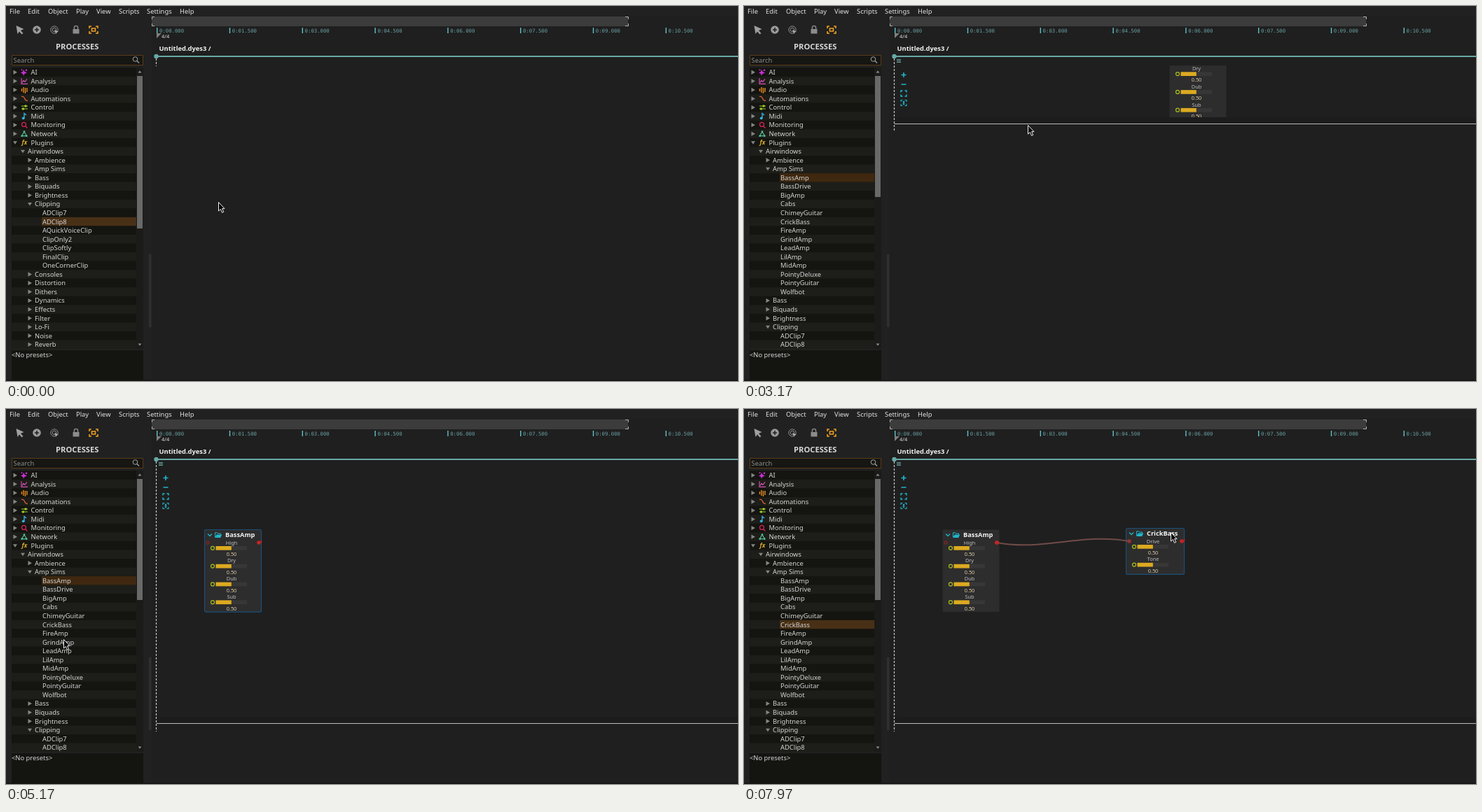
Animation of 1045 by 536 pixels, one loop 8 s. Source, as an HTML page with a canvas:

```html
<!DOCTYPE html>
<html lang="en">
<head>
<meta charset="utf-8">
<title>Processes</title>
<style>
html, body { margin: 0; width: 100%; height: 100%; overflow: hidden; background: #212121; }
canvas { display: block; }
</style>
</head>
<body>
<canvas id="stage" width="1045" height="536"></canvas>
<script>
const LOOP = 8000;
const c = document.getElementById('stage').getContext('2d');
const SANS = '"Noto Sans", "Open Sans", sans-serif';
const UI = '9.4px ' + SANS, SMALL = '7.4px ' + SANS, BOLD = 'bold 9.25px ' + SANS;
const MONO = '7.3px "DejaVu Sans Mono", monospace';
const CYAN = '#20b5cc', RED = '#c62424', TEAL = '#68a9a6';

// Pointer path: time, x, y
const path = [
  [0, 303, 280], [300, 303, 280], [860, 226, 262], [1400, 50, 231], [1500, 50, 231], [1870, 55, 239],
  [1950, 58, 243], [2380, 330, 230], [2600, 330, 230], [3170, 405, 170], [3370, 405, 170],
  [3750, 405, 451], [4170, 672, 197], [4230, 672, 197], [4700, 348, 184], [5170, 82, 329],
  [5400, 78, 307], [5500, 78, 307], [5830, 345, 205], [5950, 360, 191], [6100, 360, 191],
  [6600, 470, 170], [6970, 502, 165], [7150, 502, 165], [7420, 463, 178], [7530, 463, 178], [7970, 609, 176]
];
const EXPAND = 1470, PICK_A = 1950, DROP_A = 2400, GRAB_A = 4230, RELEASE_A = 4700,
      PICK_B = 5450, DROP_B = 6050;

function pointer(t) {
  const i = path.findIndex(p => p[0] > t);
  if (i < 0) return path[path.length - 1].slice(1);
  const [t0, x0, y0] = path[i - 1], [t1, x1, y1] = path[i];
  const u = (t - t0) / (t1 - t0), k = u * u * (3 - 2 * u);
  return [x0 + (x1 - x0) * k, y0 + (y1 - y0) * k];
}

function rect(x, y, w, h, fill) { c.fillStyle = fill; c.fillRect(x, y, w, h); }
function text(s, x, y, font, fill, align = 'left') {
  c.font = font; c.fillStyle = fill; c.textAlign = align;
  c.fillText(s, x, y);
}
function disc(x, y, r, fill) {
  c.beginPath(); c.arc(x, y, r, 0, 7); c.fillStyle = fill; c.fill();
}
function ring(x, y, r, color, w = 1) {
  c.beginPath(); c.arc(x, y, r, 0, 7); c.strokeStyle = color; c.lineWidth = w; c.stroke();
}
function line(d, color, w = 1, x = 0, y = 0) {
  c.save(); c.translate(x, y); c.strokeStyle = color; c.lineWidth = w;
  c.stroke(new Path2D(d)); c.restore();
}
function shape(d, color, x = 0, y = 0) {
  c.save(); c.translate(x, y); c.fillStyle = color; c.fill(new Path2D(d)); c.restore();
}

// Icons are centred on 0,0
const icons = {
  AI: (x, y) => {
    shape('M-1-4L.5-1 4 1 .5 2-1 5-2 2-5 1-2-1Z', '#c92fd6', x, y);
    disc(x + 3, y - 3, 1.3, '#c92fd6'); disc(x - 3.5, y - 3.5, 1, '#c92fd6');
  },
  Analysis: (x, y) => line('M-4-4V4H5M-3 2L-1-1 1 1 4-3', '#cf4fae', 1.2, x, y),
  Audio: (x, y) => line('M-3.5-2V2M-1-4V4M1.5-3V5M4-3V3', '#e58a22', 1.4, x, y),
  Automations: (x, y) => line('M-4-3H-2C1-3 0 3 4 3H5', '#d9603a', 1.3, x, y),
  Control: (x, y) => {
    line('M-4-2H5M-4 2H5', '#9ccc2e', 1.2, x, y);
    disc(x + 2, y - 2, 1.7, '#9ccc2e'); disc(x - 1.5, y + 2, 1.7, '#9ccc2e');
  },
  Midi: (x, y) => {
    line('M0 3V-4L3-1.5', '#35b2dc', 1.4, x, y); disc(x - 1.3, y + 2.8, 1.9, '#35b2dc');
  },
  Monitoring: (x, y) => { ring(x - .5, y - .7, 3, '#d0245c', 1.3); line('M2 2L4.5 4.5', '#d0245c', 1.4, x, y); },
  Network: (x, y) => {
    line('M0-3L-3.5 3H3.5Z', '#52c49a', 1.1, x, y);
    disc(x, y - 3, 1.3, '#52c49a'); disc(x - 3.3, y + 3, 1.3, '#52c49a'); disc(x + 3.3, y + 3, 1.3, '#52c49a');
  },
  Plugins: (x, y) => text('fx', x - 3.5, y + 3, 'italic bold 8.5px ' + SANS, '#dfb02c')
};

const words = s => s.split(' ');
const amps = words('BassAmp BassDrive BigAmp Cabs ChimeyGuitar CrickBass FireAmp GrindAmp LeadAmp LilAmp MidAmp PointyDeluxe PointyGuitar Wolfbot');
const clips = words('ADClip7 ADClip8 AQuickVoiceClip ClipOnly2 ClipSoftly FinalClip OneCornerClip');
const groups = ['Ambience', 'Amp Sims', ...words('Bass Biquads Brightness Clipping Consoles Distortion Dithers Dynamics Effects Filter Lo-Fi Noise Reverb')];

function treeRows(open) {
  const rows = Object.keys(icons).map(name => ({ name, depth: 0, open: name === 'Plugins' }));
  rows.push({ name: 'Airwindows', depth: 1, open: true });
  for (const name of groups) {
    const kids = name === 'Clipping' ? clips : name === 'Amp Sims' && open ? amps : [];
    rows.push({ name, depth: 2, open: kids.length > 0 });
    kids.forEach(kid => rows.push({ name: kid, depth: 3 }));
  }
  return rows.slice(0, 32);
}

function drawTree(t) {
  const open = t >= EXPAND, pitch = 12.55, top = 88.5;
  const picked = t < PICK_A ? 'ADClip8' : t < PICK_B ? 'BassAmp' : 'CrickBass';
  rect(8, 88, 188, 402, '#161613');
  treeRows(open).forEach(({ name, depth, open }, i) => {
    const y = top + i * pitch, mid = y + pitch / 2;
    rect(8, y, 178, pitch, i % 2 ? '#1d1d19' : '#141410');
    if (name === picked) rect(51, y, 135, pitch, i % 2 ? '#483016' : '#3f280f');
    if (depth < 3) shape(open ? 'M-3-2H3L0 2.5Z' : 'M-2.5-3.2L3 0-2.5 3.2Z', '#858585', [13, 24, 34][depth], mid);
    if (icons[name]) icons[name](26, mid);
    text(name, [35.5, 31, 41, 52][depth], mid + 3.4, UI, '#d4d4d4');
  });
  rect(186, 88, 10, 402, '#1b1b19');
  rect(187, 100, 8, open ? 173 : 218, '#696969');
  shape('M-2.5 1.5H2.5L0-1.5Z', '#909090', 191, 94);
  shape('M-2.5-1.5H2.5L0 1.5Z', '#909090', 191, 484);
}

function drawSidebar(t) {
  let x = [5, 31, 60, 100, 129, 161, 201, 248];
  words('File Edit Object Play View Scripts Settings Help').forEach((s, i) => text(s, x[i], 11, UI, '#e2e2e2'));

  shape('M-5-6L6-1 1.5 1 5 5 3 6.5-.5 2.5-3 6Z', '#a0a0a0', 19.5, 34);
  disc(44, 34, 5.8, '#9a9a9a');
  line('M-3 0H3M0-3V3', '#212121', 1.6, 44, 34);
  ring(69, 34, 5.2, '#8c8c8c'); ring(69, 34, 2.8, '#8c8c8c');
  shape('M0 0L6 2.5 3.5 3.5 2.5 6Z', '#b0b0b0', 69, 34);
  rect(95.5, 33, 9, 6.5, '#8c8c8c');
  line('M-2.6 0V-2A2.6 2.6 0 0 1 2.6-2V0', '#8c8c8c', 1.4, 100, 33);
  line('M-6-2V-5H-3M3-5H6V-2M6 2V5H3M-3 5H-6V2', '#f0a020', 1.6, 125, 34);
  line('M-2.5-2H2.5V2H-2.5Z', '#f0a020', 1.6, 125, 34);

  text('PROCESSES', 101.7, 62, 'bold 11.2px ' + SANS, '#d6d6d6', 'center');
  rect(8, 70, 188, 15, '#161613');
  line('M8.5 70.5H195.5V84.5H8.5Z', '#593c18');
  text('Search', 10.5, 80.5, UI, '#8c8c8c');
  ring(184.5, 76, 3.3, '#a5a5a5'); line('M187 78.5L190 81.5', '#a5a5a5', 1.2);

  drawTree(t);
  rect(8, 492, 188, 44, '#141411');
  text('<No presets>', 8, 502, UI, '#d4d4d4');
  rect(204, 355, 3.5, 104, '#303030');
}

function drawTimeline() {
  rect(208, 15, 680, 14, '#3c3c3c');
  line('M212 15.5H208.5V19M208.5 25V28.5H212M884 15.5H888.5V19M888.5 25V28.5H884', '#b0b0b0');
  for (let i = 0; i < 8; i++) {
    const x = 215 + i * 103.8, s = (i * 1.5).toFixed(3);
    rect(x, 31, 1.4, 8, '#62c3ca');
    text('0:' + s.padStart(6, '0'), x + 4, 38, MONO, '#6aa0a2');
  }
  shape('M0 0H7L0 7Z', '#808080', 215, 39);
  text('4/4', 222, 46, SMALL, '#e0e0e0');
  text('Untitled.dyes3 /', 218.5, 63.5, 'bold 9.35px ' + SANS, '#f2f2f2');
}

function drawNode({ name, params, x, y, w, border, wiredIn, wiredOut }) {
  const h = 15 + params.length * 25.9;
  c.save(); c.translate(x, y);
  c.beginPath(); c.roundRect(.5, .5, w - 1, h - 1, 2);
  c.fillStyle = '#2d2d2d'; c.fill();
  if (border) { c.strokeStyle = border; c.lineWidth = 1.2; c.stroke(); }
  line('M5 6.5L8 9.5 11 6.5', CYAN, 1.3);
  line('M15.5 11.5V4.8H18.5L19.5 6H23.5V7.5', CYAN, 1);
  shape('M15.5 12L17.5 7.5H25.2L23.2 12Z', CYAN);
  text(name, 30, 11, BOLD, '#f4f4f4');
  if (wiredIn) disc(5, 19, 2.8, '#a82a2a'); else ring(5, 19, 2.2, '#a52222');
  disc(w - 4, 19, 2.8, RED);
  if (!wiredOut) line(`M${w - 4} 19L${w - .5} 18V15.5`, RED, 1.3);
  params.forEach((label, i) => {
    const dy = i * 25.8;
    text(label, 39, dy + 21.6, SMALL, '#bdbdbd', 'center');
    rect(16.5, dy + 24, 44.5, 5.7, '#373737');
    rect(16.5, dy + 24, 22.3, 5.7, '#dcaa20');
    ring(12, dy + 26.8, 2.5, '#a8c021', 1.2);
    text('0.50', 39, dy + 38.1, SMALL, '#dfcda8', 'center');
  });
  c.restore();
}

function drawCable(x0, y0, x1, y1) {
  const w = x1 - x0, sag = w * .065;
  line(`M${x0} ${y0}C${x0 + w * .35} ${y0 + sag} ${x1 - w * .35} ${y1 - sag} ${x1} ${y1}`, '#704b48', 2);
}

function drawScore(t, px, py) {
  const live = t >= DROP_A;
  const bottom = !live ? 74 : t < 3370 ? 168 : t < 3750 ? py - 2 : 449;
  if (live) {
    rect(215, bottom - 9, 830, 9, '#1c1c1c');
    c.save();
    c.beginPath(); c.rect(215, 85, 830, bottom - 94); c.clip();
    let x = 607, y = bottom / 2 - 39.5;
    if (t >= GRAB_A) {
      const held = t < RELEASE_A;
      x = held ? px - 65 : 283;
      y = held ? py - 12 : 172;
    }
    const second = t >= DROP_B;
    const hover = px > x && px < x + 82 && py > y && py < y + 118;
    const border = second ? null : t >= GRAB_A ? '#1b4f78' : hover ? '#5a5a5a' : null;
    drawNode({ name: 'BassAmp', params: words('High Dry Dub Sub'), x, y, w: 82, border, wiredOut: second });
    if (second) {
      const moved = t >= 7530, bx = moved ? px - 64 : 399, by = moved ? py - 6 : 172;
      drawNode({ name: 'CrickBass', params: words('Drive Tone'), x: bx, y: by, w: 84, border: '#1b4f78', wiredIn: true });
      drawCable(x + 78, y + 19, bx + 5, by + 19);
      disc(x + 78, y + 19, 2.8, RED);
    }
    c.restore();
    rect(215, bottom, 830, 1, '#bcbcbc');
    line('M218 76.5H224M218 78.5H224M218 80.5H224', TEAL, 1);
    line('M-3.5 0H3.5M0-3.5V3.5M-3.5 13.5H3.5', CYAN, 1.6, 228, 98.5);
    const frame = 'M-4-1.5V-4H-1.5M1.5-4H4V-1.5M4 1.5V4H1.5M-1.5 4H-4V1.5';
    line(frame, CYAN, 1.4, 228, 125);
    line(frame + 'M0-2V2M-1.3-1L0-2.3 1.3-1M-1.3 1L0 2.3 1.3 1', CYAN, 1.1, 228, 138.5);
  }
  c.setLineDash([3, 2]);
  line(`M214.5 75V${bottom + 12}`, '#c8c8c8', 1.2);
  c.setLineDash([]);
  rect(215, 71, 830, 2, TEAL);
  disc(214.5, 72, 3.2, TEAL);
}

function drawPointer(x, y) {
  const d = new Path2D('M.5.5V13L3.4 10.4 5.5 15.3 7.7 14.3 5.6 9.6H9Z');
  c.save(); c.translate(x, y);
  c.fillStyle = '#000'; c.fill(d);
  c.strokeStyle = '#f4f4f4'; c.lineWidth = 1; c.stroke(d);
  c.restore();
}

function draw(now) {
  const t = now % LOOP, [px, py] = pointer(t);
  rect(0, 0, 1045, 536, '#212121');
  rect(208, 14, 837, 522, '#1f1f1f');
  drawSidebar(t);
  drawTimeline();
  drawScore(t, px, py);
  rect(0, 534.5, 1045, 1.5, '#171314');
  drawPointer(px, py);
  requestAnimationFrame(draw);
}
draw(0);
</script>
</body>
</html>
```
